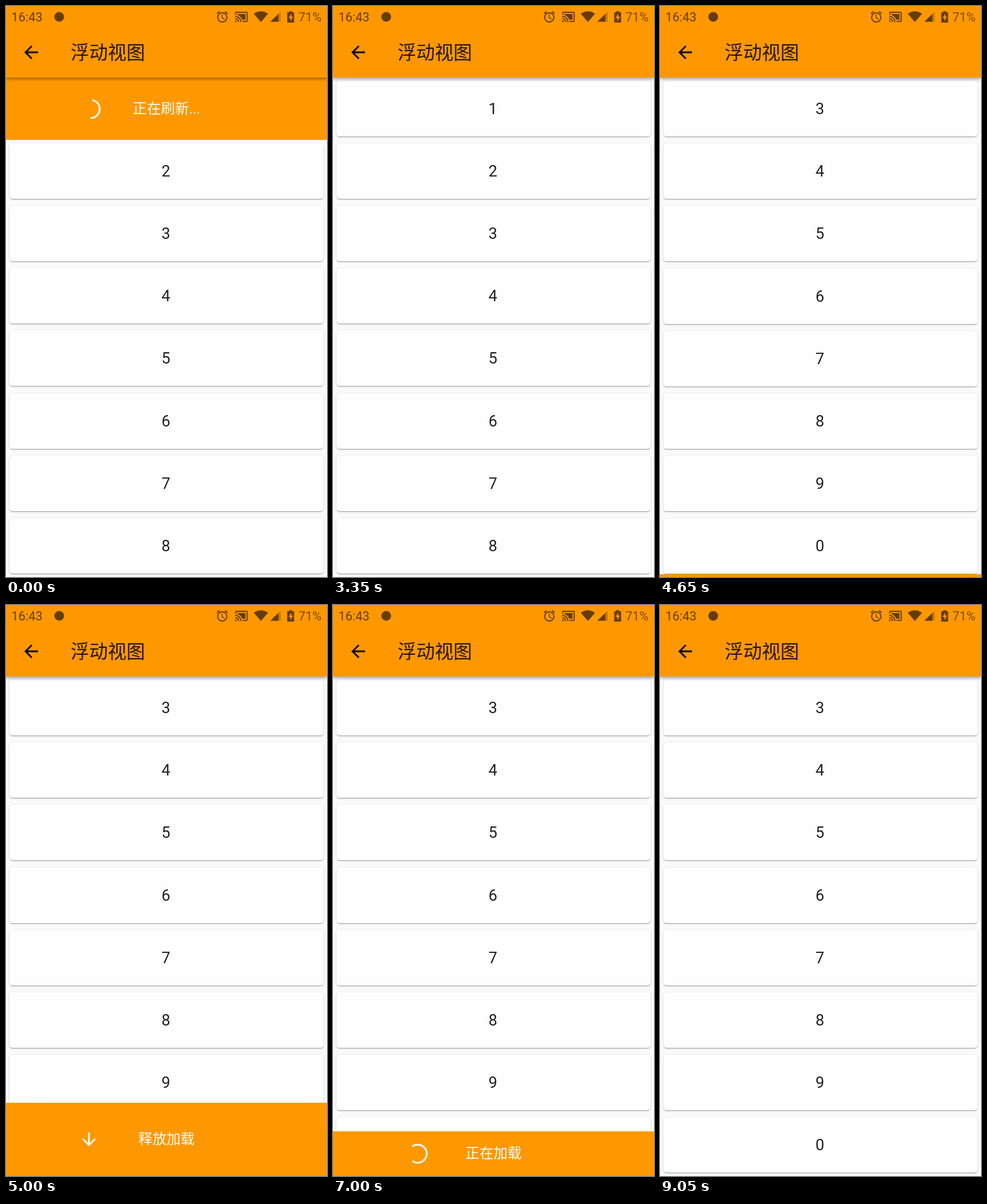
Write an HTML page that moves like this. It is 561x998 px and loops after 9850 ms.

```html
<!DOCTYPE html>
<html lang="zh-CN">
<head>
<meta charset="utf-8">
<title>浮动视图</title>
<style>
  html, body { margin: 0; width: 100%; height: 100%; overflow: hidden; background: #fafafa; }
  body { font-family: Roboto, "Noto Sans CJK SC", "Noto Sans CJK", sans-serif; }
  #stage { position: relative; width: 561px; height: 998px; overflow: hidden; background: #fafafa; }
  #stage div, #stage svg { position: absolute; }
  #bar { left: 0; top: 0; width: 561px; height: 125px; background: #ff9800; z-index: 3;
    box-shadow: 0 3px 5px rgba(0,0,0,.26), 0 1px 8px rgba(0,0,0,.16); }
  #title { left: 113px; top: 58px; font-size: 32.5px; line-height: 48px; color: rgba(0,0,0,.87); white-space: nowrap; }
  #list { left: 0; top: 125px; width: 561px; }
  .card { left: 6px; width: 549px; height: 97px; border-radius: 5.5px; background: #fefefe;
    box-shadow: 0 2px 1px -1px rgba(0,0,20,.2), 0 1px 2px rgba(0,0,20,.17), 0 1px 4px rgba(0,0,20,.1);
    font-size: 27.3px; line-height: 98px; text-align: center; color: rgba(0,0,0,.87); }
  .card span { position: relative; left: -1px; }
  .panel { left: 0; width: 561px; background: #ff9800; overflow: hidden; color: #fff; z-index: 1; }
  #head { top: 125px; }
  #foot { bottom: 0; }
  .row { left: 0; top: 0; width: 561px; height: 40px; }
  .label { left: 0; width: 561px; height: 40px; line-height: 40px; font-size: 24.6px; text-align: center; white-space: nowrap; }
  .icon { left: 127px; top: 2px; fill: #fff; }
  .ring { left: 128px; top: 0; fill: none; stroke: #fff; stroke-width: 3; }
</style>
</head>
<body>
<div id="stage">
  <div id="list"></div>
  <div id="head" class="panel"></div>
  <div id="foot" class="panel"></div>
  <div id="bar">
    <svg width="561" height="125" style="left:0;top:0">
      <g fill="#663d00" font-size="21.8" font-family="Roboto, sans-serif">
        <text x="9.5" y="27">16:43</text>
        <text x="511" y="27" fill-opacity=".85">71%</text>
        <circle cx="93" cy="19" r="8.5"/>
        <path transform="translate(366 7)" d="M22 5.72l-4.6-3.86-1.29 1.53 4.6 3.86L22 5.72zM7.88 3.39L6.6 1.86 2 5.71l1.29 1.53 4.59-3.85zM12.5 8H11v6l4.75 2.85.75-1.23-4-2.37V8zM12 4c-4.97 0-9 4.03-9 9s4.02 9 9 9c4.97 0 9-4.03 9-9s-4.03-9-9-9zm0 16c-3.87 0-7-3.13-7-7s3.13-7 7-7 7 3.13 7 7-3.13 7-7 7z"/>
        <path transform="translate(399.5 7)" d="M1 18v3h3c0-1.66-1.34-3-3-3zm0-4v2c2.76 0 5 2.24 5 5h2c0-3.87-3.13-7-7-7zm18-7H5v1.63c3.96 1.28 7.09 4.41 8.37 8.37H19V7zM1 10v2c4.97 0 9 4.03 9 9h2c0-6.08-4.93-11-11-11zm20-7H3c-1.1 0-2 .9-2 2v3h2V5h18v14h-7v2h7c1.1 0 2-.9 2-2V5c0-1.1-.9-2-2-2z"/>
        <path d="M433 13.5Q445.5 5 458 13.5L445.5 28Z"/>
        <path d="M462 27.5L480 10V27.5Z" fill-opacity=".35"/>
        <path d="M462 27.5L476 14V27.5Z"/>
        <path d="M495 11V9h5v2h3.5v18h-12V11Z"/>
        <path d="M498.5 13l-4.5 8h3v5.500l4.500-8h-3z" fill="#ff9800"/>
      </g>
      <path transform="translate(26 63) scale(1.5)" d="M20 11H7.830l5.590-5.590L12 4l-8 8 8 8 1.410-1.410L7.830 13H20v-2z"/>
    </svg>
    <div id="title">浮动视图</div>
  </div>
</div>
<script>
const LOOP = 9850, STEP = 50, PITCH = 109.1, HEAD = 109, FOOT = 78, FOOT_MIN = 70;
const ARROW = 'M20 12l-1.41-1.41L13 16.17V4h-2v12.17l-5.58-5.59L4 12l8 8 8-8z';
const CHECK = 'M9 16.17L4.83 12l-1.42 1.41L9 19 21 7l-1.41-1.41z';
const $ = id => document.getElementById(id);

$('list').innerHTML = [...'1234567890'].map((n, i) =>
  `<div class="card" style="top:${i * PITCH + 6}px"><span>${n}</span></div>`).join('');

const clamp = x => Math.min(1, Math.max(0, x));
const sine = x => (1 - Math.cos(Math.PI * x)) / 2;

// Eased value through [time, value] stops
function track(t, stops) {
  let [t0, v0] = stops[0];
  for (const [t1, v1] of stops) {
    if (t < t1) return v0 + (v1 - v0) * sine(clamp((t - t0) / (t1 - t0)));
    [t0, v0] = [t1, v1];
  }
  return v0;
}

// cubic-bezier(.4, 0, .2, 1)
function swift(x) {
  x = clamp(x);
  let lo = 0, hi = 1;
  for (let i = 0; i < 20; i++) {
    const s = (lo + hi) / 2, r = 1 - s;
    if (1.2 * r * r * s + .6 * r * s * s + s * s * s < x) lo = s; else hi = s;
  }
  return lo * lo * (3 - 2 * lo);
}

// Material spinner: head runs ahead, then the tail catches up
function arc(u) {
  const step = Math.floor(u) % 5, f = u % 1;
  const head = swift(f * 2), tail = swift(f * 2 - 1);
  const sweep = Math.max(1, 270 * (head - tail));
  const start = -90 + 270 * tail + 306 * f - 144 * step;
  const point = a => {
    const r = a * Math.PI / 180;
    return `${20 + 15.8 * Math.cos(r)} ${20 + 15.8 * Math.sin(r)}`;
  };
  return `M${point(start)}A15.8 15.8 0 ${sweep > 180 ? 1 : 0} 1 ${point(start + sweep)}`;
}

function makePanel(id) {
  const el = $(id);
  el.innerHTML = `<div class="row">
    <svg class="icon" width="36" height="36" viewBox="0 0 24 24"><path/></svg>
    <svg class="ring" width="40" height="40"><path/></svg>
    <div class="label"></div></div>`;
  const [icon, ring] = el.querySelectorAll('svg');
  const row = el.querySelector('.row'), label = el.querySelector('.label');
  return (height, centre, text, shape, spin, turn = 0) => {
    el.style.height = height + 'px';
    el.style.display = height > 0 ? '' : 'none';
    row.style.top = centre - 20 + 'px';
    label.textContent = text;
    icon.style.display = shape ? '' : 'none';
    ring.style.display = shape ? 'none' : '';
    icon.style.transform = `rotate(${turn}deg)`;
    if (shape) icon.firstChild.setAttribute('d', shape);
    else ring.firstChild.setAttribute('d', arc(spin));
  };
}
const head = makePanel('head'), foot = makePanel('foot');

function draw(t) {
  const scroll = track(t, [[3600, 0], [3900, 218]]);
  $('list').style.transform = `translateY(${-scroll}px)`;

  const top = track(t, [[2050, HEAD], [2400, 0]]);
  const busy = t < 1200;
  head(top, top - HEAD / 2, busy ? '正在刷新...' : '刷新结束', busy ? '' : CHECK, 2.65 + t / 1000);

  const low = track(t, [[4600, 0], [5000, 128], [5200, 134], [5300, 134], [5600, FOOT], [7790, FOOT], [8150, 0]]);
  const mid = Math.max(low, FOOT_MIN) / 2;
  if (t < 5650) {
    const turn = track(t, [[4840, 180], [5000, 0]]);
    foot(low, mid, t < 4840 ? '上拉加载' : '释放加载', ARROW, 0, turn);
  } else if (t < 7050) {
    foot(low, mid, '正在加载', '', (t - 5650) / 1000);
  } else {
    foot(low, mid, '加载结束', CHECK);
  }
}

function frame() {
  draw(Math.floor(performance.now() % LOOP / STEP) * STEP);
  requestAnimationFrame(frame);
}
frame();
</script>
</body>
</html>
```
